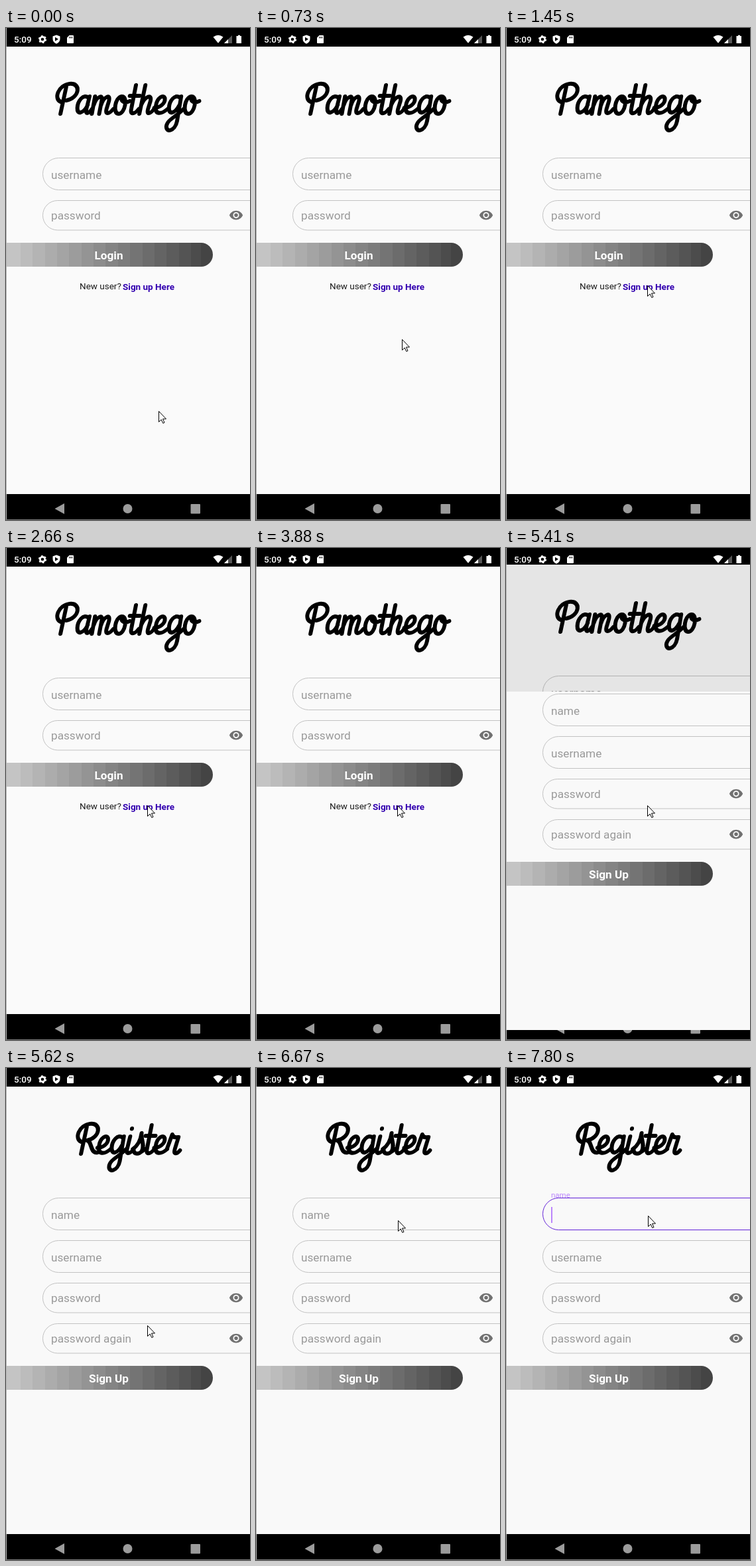
Recreate the animation shown at these times as an HTML page. Size 368 by 740 pixels, loop 8000 ms.

```html
<!DOCTYPE html>
<html lang="en">
<head>
<meta charset="utf-8">
<title>Sign up flow</title>
<style>
html, body { margin: 0; width: 100%; height: 100%; overflow: hidden; background: #000; }
svg { display: block; width: 368px; height: 740px; }
text { font-family: Roboto, sans-serif; }
.hint { font-size: 17.2px; fill: #999; }
.button { font-size: 17.2px; font-weight: 700; fill: #fff; text-anchor: middle; }
.script { fill: none; stroke: #000; stroke-width: 6; stroke-linecap: round; stroke-linejoin: round; }
.field { fill: none; stroke: #c2c2c2; }
</style>
</head>
<body>
<svg id="stage" viewBox="0 0 368 740"></svg>
<script>
// Brush letters as pen strokes on baseline 0: [advance, path]
const bowl = 'M17-25C8-32 1-20 2-10C3 1 12-1 17-14';
const capital = 'M14-41L11-1M9-19C-3-24 2-44 18-46C36-48 37-25 17-21';
const glyphs = {
  P: [32, capital],
  R: [34, capital + 'C25-21 24-1 36-3'],
  a: [22, bowl + 'M18-27L16-9C15 0 20 0 24-8'],
  e: [19, 'M0-10C8-10 16-16 14-24C11-31 2-25 2-13C2 1 12 0 20-8'],
  g: [22, bowl + 'M18-27L17 10C16 26 2 28 2 17C2 8 14 4 24-8'],
  h: [22, 'M5-44L2-1M3-14C7-28 17-31 16-20L14-8C13 0 18 0 23-8'],
  i: [11, 'M5-27L3-8C2 0 8 0 13-8M6-39v.5'],
  m: [32, 'M3-27L2-1M3-14C6-28 15-31 14-20L13-1M14-14C17-28 26-31 25-20L23-8C22 0 28 0 33-8'],
  o: [22, 'M10-27C0-26 0-1 9-1C19-1 20-27 10-27C10-18 17-17 23-20'],
  r: [17, 'M0-8L5-30C7-24 14-26 15-26L12-8C11 0 16 0 20-6'],
  s: [17, 'M0-8C8-14 10-24 10-32C10-22 18-14 14-5C11 0 4 0 2-5M14-4L19-8'],
  t: [14, 'M6-44L4-9C3 1 10 0 15-8M-1-28H14']
};

function script(word, x, spacing) {
  const letters = [...word].map(c => {
    const [advance, d] = glyphs[c];
    const part = `<path d="${d}" transform="translate(${x} 130) skewX(-8)"/>`;
    x += advance + spacing;
    return part;
  });
  return `<g class="script" role="img" aria-label="${word}">${letters.join('')}</g>`;
}

const eye = y => `<path fill="#717171" transform="translate(336 ${y - 11}) scale(.92)" d="M12 4.5C7 4.5 2.73 7.61 1 12c1.73 4.39 6 7.5 11 7.5s9.27-3.11 11-7.5c-1.73-4.39-6-7.5-11-7.5zM12 17a5 5 0 1 1 0-10 5 5 0 0 1 0 10zm0-8a3 3 0 1 0 0 6 3 3 0 0 0 0-6z"/>`;

function field(label, y, secret, id = '') {
  const h = secret ? 44.5 : 48;
  const r = h / 2;
  return `<path class="field" id="${id}Box" d="M369 ${y + .5}H${55.5 + r}a${r} ${r} 0 0 0 0 ${h}H369"/>
    <text class="hint" id="${id}Hint" x="68" y="${y + (secret ? 29 : 32)}">${label}</text>${secret ? eye(y + 22.5) : ''}`;
}

function button(label, y) {
  let bands = '';
  for (let i = 0; i < 17; i++) {
    const x = i ? 22 + Math.round((i - 1) * 18.35) : 1;
    const end = 22 + Math.round(i * 18.35);
    const grey = 196 - 8 * i;
    const fill = `fill="rgb(${grey},${grey},${grey})"`;
    bands += i < 16
      ? `<path ${fill} d="M${x} ${y}H${Math.min(end, 294)}V${y + 36}H${x}z"/>`
      : `<path ${fill} d="M294 ${y}a18 18 0 0 1 0 36z"/>`;
  }
  return `${bands}<text class="button" x="155" y="${y + 25}">${label}</text>`;
}

const page = (fill, content) => `<path fill="${fill}" d="M0 28H368V701H0z"/>${content}`;

const login = page('#fafafa', script('Pamothego', 71, 1.2)
  + field('username', 195) + field('password', 259, true) + button('Login', 323)
  + `<text x="111" y="392.5" font-size="13.5" fill="#1c1c1c">New user?</text>
     <text x="176" y="394" font-size="13.5" font-weight="700" fill="#3200b0">Sign up Here</text>`);

const register = page('#f9f9f9', script('Register', 102, .5)
  + field('name', 195, false, 'name') + field('username', 259)
  + field('password', 323, true) + field('password again', 384, true) + button('Sign Up', 448)
  + '<path id="caret" fill="#bb86fc" d="M68 209h2v24h-2z"/>');

const statusBar = `<g fill="#fff">
  <text x="12" y="22" font-size="13.5" font-weight="500">5:09</text>
  <g fill="none" stroke="#fff"><circle cx="55" cy="17" r="3.6" stroke-width="2.6"/>
    <circle cx="55" cy="17" r="5.2" stroke-width="1.8" stroke-dasharray="2.7 2.745"/></g>
  <path d="M76 10.5l5.5 2v4c0 3.5-2.3 6-5.5 7.3-3.2-1.3-5.5-3.8-5.5-7.3v-4z"/>
  <path fill="#000" d="M74 13.8l5 3-5 3z"/>
  <path d="M95.5 11h5.5q1 0 1 1v10q0 1-1 1h-8q-1 0-1-1v-7.5z"/>
  <path fill="#000" d="M95.2 13h1v2.5h-1zM97.2 13h1v2.5h-1zM99.2 13h1v2.5h-1z"/>
  <path d="M312.5 13.5q7.5-5.5 15 0L320 22.7z"/>
  <path fill="#555" d="M341 11v12h-12z"/><path d="M335 17v6h-6z"/>
  <path d="M350 10.8h3v1.2h2v11h-7.5V12h2.5z"/></g>`;

const navBar = `<g fill="#9b9b9b"><path d="M73.5 723L88 715V731z"/>
  <circle cx="183.5" cy="723" r="7"/><rect x="278.5" y="716" width="14.5" height="14.5" rx="1"/></g>`;

const stage = document.getElementById('stage');
stage.innerHTML = `<clipPath id="reveal"><rect id="window" width="368" height="740"/></clipPath>
  <path d="M0 0H368V740H0z"/>${navBar}
  <g id="old">${login}<path id="dim" d="M0 28H368V701H0z"/></g>
  <g clip-path="url(#reveal)"><g id="next">${register}</g></g>
  ${statusBar}
  <path fill="#b4b4b4" d="M0 0h1v740h-1z"/><path fill="#777" d="M0 739h368v1H0z"/>
  <path id="cursor" fill="#fff" stroke="#000" d="M.5.5V16.5l3.7-3.5 2.6 5.5 2.2-1-2.5-5.5h5z"/>
  <g id="click" fill="none"><circle r="10" stroke="#000"/><circle r="9" stroke="#fff"/></g>`;

const el = id => document.getElementById(id);
const set = (id, name, value) => el(id).setAttribute(name, value);
const show = (id, on) => set(id, 'visibility', on ? 'visible' : 'hidden');
const move = (id, x, y) => set(id, 'transform', `translate(${x} ${y})`);
const ease = p => p * p * (3 - 2 * p);

// [start, old page shift, dimming, reveal top, new page shift]
const slides = [
  [0, 0, 0, 740, 0],
  [5260, -1, .04, 651, 29],
  [5410, -3, .088, 216, 24],
  [5620, 0, 0, 28, 0]
];

// Stepped glide of the pointer
function glide(t, start, steps, from, to) {
  const k = Math.min(steps, Math.floor((t - start) / 90) + 1);
  const p = ease(k / steps);
  return from.map((v, i) => Math.round(v + (to[i] - v) * p));
}

function pointer(t) {
  if (t < 370) return [230, 576];
  if (t < 1180) return glide(t, 370, 9, [230, 576], [213, 391]);
  if (t < 1450) return [213, 386];
  if (t < 6050) return [213, 387];
  return glide(t, 6050, 8, [213, 387], [214, 222]);
}

function draw(t) {
  const [, oldY, dim, top, newY] = slides.filter(s => t >= s[0]).pop();
  move('old', 0, oldY);
  set('dim', 'opacity', dim);
  set('window', 'y', top);
  move('next', 0, newY);

  const [x, y] = pointer(t);
  move('cursor', x, y);
  move('click', x + 1.5, y + 1.5);
  show('click', t >= 1830 && t < 2010 || t >= 6760 && t < 6880);

  const floating = t >= 7800;
  show('caret', t >= 7150);
  el('nameBox').style.stroke = t >= 7540 ? '#6222d8' : '';
  el('nameHint').style.fill = t >= 7150 ? '#bb86fc' : '';
  el('nameHint').style.fontSize = floating ? '11.5px' : '';
  set('nameHint', 'y', floating ? 195 : 227);
}

const begin = performance.now();
function tick() {
  draw((performance.now() - begin) % 8000);
  requestAnimationFrame(tick);
}
tick();
</script>
</body>
</html>
```
